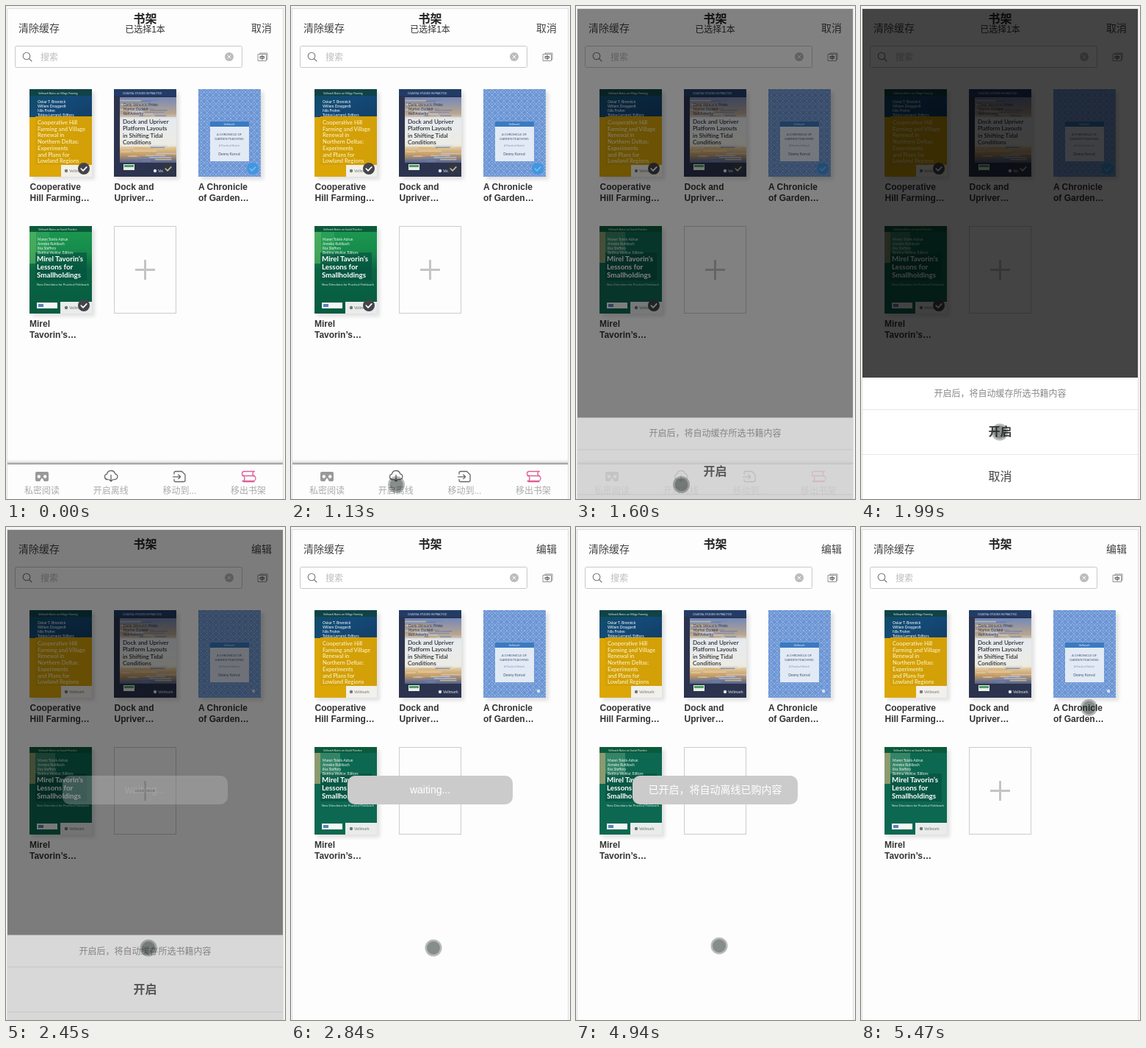
Write an HTML page that moves like this. It is 380 px wide and 670 px high and loops after 5550 ms.

```html
<!DOCTYPE html>
<html lang="zh-CN">
<head>
<meta charset="utf-8">
<title>书架</title>
<style>
html, body { margin: 0; width: 100%; height: 100%; overflow: hidden; background: #f5f5f5; }
svg { display: block; }
text { font-family: "Liberation Sans", "Noto Sans CJK SC", "Noto Sans CJK", sans-serif; white-space: pre; }
.cover text { font-family: Lato, "Open Sans", sans-serif; }
.cap { font-size: 12px; font-weight: 700; fill: #333; }
.tab { font-size: 12px; fill: #aaa; }
.line { fill: none; stroke: #666; stroke-width: 1.3; stroke-linecap: round; stroke-linejoin: round; }
</style>
</head>
<body>
<svg id="stage" width="380" height="670" viewBox="0 0 380 670"></svg>
<script>
const LOOP = 5550;
const FADE = 500;
const SHEET_H = 165;
const DIM = 0.73;

const rect = (x, y, w, h, fill, extra = "") =>
  `<rect x="${x}" y="${y}" width="${w}" height="${h}" fill="${fill}" ${extra}/>`;
const circle = (x, y, r, fill, extra = "") =>
  `<circle cx="${x}" cy="${y}" r="${r}" fill="${fill}" ${extra}/>`;
const path = (d, extra = "") => `<path class="line" d="${d}" ${extra}/>`;
const text = (x, y, size, fill, s, extra = "") =>
  `<text x="${x}" y="${y}" font-size="${size}" fill="${fill}" ${extra}>${s}</text>`;
const mid = (x, y, size, fill, s, extra = "") =>
  text(x, y, size, fill, s, 'text-anchor="middle" ' + extra);
const lines = (x, y, step, size, fill, list, extra) =>
  list.map((s, i) => text(x, y + i * step, size, fill, s, extra)).join("");
const group = (id, body, extra = "") => `<g id="${id}" ${extra}>${body}</g>`;

function random(seed) {
  return () => (seed = (seed * 16807) % 2147483647) / 2147483647;
}

function cover(x, y, body) {
  return rect(x + 4, y + 4, 85, 119, "#000", 'opacity=".11" filter="url(#soft)"') +
    `<g class="cover" transform="translate(${x} ${y})"><svg width="85" height="119">${body}</svg></g>`;
}

function publisher(x, y, fill) {
  return circle(x, y, 2.2, fill) + text(x + 4, y + 2, 5.5, fill, "Vellmark");
}

function farmBook() {
  const top = rect(0, 0, 85, 38, "url(#farm)") + rect(0, 0, 85, 9, "#0f4347") +
    text(12, 6.5, 3.6, "#e4efe6", "Vellmark Notes on Village Farming");
  const authors = ["Oskar T. Brennick", "Willem Draygardt", "Nils Frohm", "Tobias Lerrand, Editors"];
  const title = ["Cooperative Hill", "Farming and Village", "Renewal in", "Northern Deltas:", "Experiments", "and Plans for", "Lowland Regions"];
  return rect(0, 0, 85, 119, "#dba606") + top + rect(8, 37, 77, 66, "#d3a008") +
    lines(11, 18.5, 6.1, 5, "#fff", authors) +
    lines(11, 48, 8.7, 7.6, "#fff3c4", title, 'font-weight="500"') +
    rect(43, 103, 42, 16, "#f1f0ea") + publisher(50, 111, "#777");
}

function harbourBook() {
  const rnd = random(77);
  const tones = ["#7087bb", "#d9a566", "#c9d4e6", "#5f77aa", "#ecd9a6"];
  let streaks = "";
  for (let i = 0; i < 40; i++) {
    const y = i < 20 ? 12 + rnd() * 24 : 76 + rnd() * 22;
    streaks += rect(8 + rnd() * 50, y, 12 + rnd() * 25, 1.5, tones[i % 5], 'opacity=".65"');
  }
  const authors = ["Dario Velmonte Prisko", "Marten Oudekil", "Rolf Ankerby"];
  const title = ["Dock and Upriver", "Platform Layouts", "in Shifting Tidal", "Conditions"];
  return rect(0, 0, 85, 119, "#2b334e") + rect(0, 0, 85, 9, "#223c67") +
    text(12, 6.5, 3.6, "#dfe6f2", "COASTAL STUDIES IN PRACTICE") +
    rect(8, 11, 77, 89, "url(#harbour)") + streaks +
    rect(9, 38, 76, 40, "#eceff4", 'opacity=".7"') +
    lines(13, 22.5, 6.2, 4.8, "#27314d", authors) +
    lines(12, 47, 9.4, 8.1, "#1b1d24", title, 'font-weight="500"') +
    rect(13, 102, 15, 8, "#e7f0e6") + rect(14, 103, 13, 3, "#4d9b66") +
    publisher(56, 111, "#dfe3ec");
}

function gardenBook() {
  return rect(0, 0, 85, 119, "url(#lattice)") + rect(16, 44, 53, 54, "#e2eaf5") +
    rect(16, 44, 53, 7, "#3a7ac2") + mid(42, 49.3, 4, "#dbe8f7", "Vellmark") +
    mid(42, 62.5, 4.2, "#47546c", "A CHRONICLE OF") +
    mid(42, 68.5, 4.2, "#47546c", "GARDEN TEACHING") +
    mid(42, 77.5, 3.6, "#8494ad", "A Practical Sketch") +
    mid(42, 90, 5, "#47546c", "Denny Korval") + circle(75, 110, 2.2, "#d5e2f4");
}

function legacyBook() {
  const authors = ["Maren Tolvik-Adrun", "Anneke Ruhlbach", "Ilka Steffory", "Bettina Wohlar, Editors"];
  return rect(0, 0, 85, 119, "#07604b") +
    group("brightTop", rect(0, 0, 85, 119, "url(#bright)") + rect(0, 8, 9, 43, "#6bbf68", 'opacity=".55"') + rect(9, 8, 18, 43, "#3fae62", 'opacity=".4"')) +
    group("dullTop", rect(0, 0, 85, 119, "#0d6851") + rect(0, 8, 8, 42, "#b5ac78", 'opacity=".75"') + rect(8, 8, 27, 36, "#5f9f7e", 'opacity=".5"')) +
    rect(0, 0, 85, 8, "#0b5a3c") +
    text(12, 6, 3.6, "#dcece3", "Vellmark Notes on Social Practice") +
    rect(8, 36, 70, 38, "#04513f", 'opacity=".65"') +
    lines(11, 20, 6, 4.8, "#f2f8f4", authors) +
    lines(10, 47.5, 11.4, 9.8, "#fff", ["Mirel Tavorin’s", "Lessons for", "Smallholdings"], 'font-weight="700"') +
    text(10, 80.5, 4.2, "#e2efe8", "New Directions for Practical Fieldwork") +
    rect(10, 104, 28, 8, "#f5f7f6") + rect(12, 106, 7, 4, "#5b82b8") +
    rect(42, 103, 43, 16, "#e9ecea") + publisher(50, 111, "#697570");
}

function check(x, y, fill, mark = "#fff") {
  return circle(x, y, 8, fill) +
    path(`M${x - 3.8} ${y}l2.8 2.8l4.8 -5`, `style="stroke:${mark};stroke-width:1.7"`);
}

function tabBar() {
  const labels = ["私密阅读", "开启离线", "移动到...", "移出书架"];
  const pink = 'style="stroke:#de5f99"';
  const goggles = '<path fill="#999" d="M42 633h14q2 0 2 2v9q0 2-2 2h-3q-1.5 0-2-1.5l-1-2q-1-1.5-2 0l-1 2q-.5 1.5-2 1.5h-3q-2 0-2-2v-9q0-2 2-2z"/>' +
    circle(44.8, 639.5, 2.2, "#fdfdfd") + circle(53.2, 639.5, 2.2, "#fdfdfd");
  return rect(2, 616, 375, 7, "url(#edge)") + rect(2, 623, 375, 47, "#fdfdfd") + goggles +
    path("M139 643.5h-1a3.700 3.700 0 0 1-.6-7.300a5.800 5.800 0 0 1 11.300-.4a3.900 3.900 0 0 1-.4 7.700h-1.300M143 637.5v8.500M140.5 643.700l2.500 2.300l2.500-2.300") +
    path("M229 636v-1.500q0-2 2-2h8.500l4.5 4.500v7.500q0 2-2 2h-11q-2 0-2-2v-1M227.5 639.8h10M234.8 637l2.8 2.8l-2.800 2.800") +
    path("M338.5 632.5h-14a3 3 0 0 0 0 6h14M337 632.5q-2 3 0 6M322 638.5h14.5a3.500 3.500 0 0 1 0 7h-14.500M324 638.5q2 3.500 0 7M338 646.5h-15", pink) +
    labels.map((s, i) => `<text class="tab" x="${49 + i * 93.7}" y="662.5" text-anchor="middle">${s}</text>`).join("");
}

function sheet() {
  const top = 670 - SHEET_H;
  return rect(2, top, 375, SHEET_H, "#fff") +
    mid(189.5, top + 26, 12, "#888", "开启后，将自动缓存所选书籍内容") +
    rect(2, top + 43, 375, 1, "#e6e6e6") +
    mid(189.5, top + 79, 16, "#444", "开启", 'font-weight="700"') +
    rect(2, top + 104, 375, 1, "#e6e6e6") +
    mid(189.5, top + 140, 16, "#444", "取消");
}

const toast = s => rect(77, 338, 225, 39, "#cbcbcb", 'rx="10"') + mid(189.5, 362, 14, "#fff", s);

const stops = list => list.map(([o, c, a = 1]) => `<stop offset="${o}" stop-color="${c}" stop-opacity="${a}"/>`).join("");
const gradient = (id, list, dir = 'x2="0" y2="1"') => `<linearGradient id="${id}" ${dir}>${stops(list)}</linearGradient>`;

const defs = `<defs>
<filter id="soft" x="-20%" y="-20%" width="140%" height="140%"><feGaussianBlur stdDeviation="2.5"/></filter>
<pattern id="lattice" width="8" height="8" patternUnits="userSpaceOnUse">${rect(0, 0, 8, 8, "#6c95d4")}<path d="M0 4L4 0L8 4L4 8Z" fill="none" stroke="#93b3e3" stroke-width=".9"/>${circle(4, 4, 0.9, "#93b3e3")}</pattern>` +
  gradient("farm", [[0, "#0d4d60"], [0.5, "#144a78"], [1, "#123f66"]], 'x2="1" y2="1"') +
  gradient("harbour", [[0, "#7489b8"], [0.25, "#b9a58e"], [0.35, "#dcdfe4"], [0.7, "#f0e4c4"], [0.87, "#c79d66"], [1, "#52628f"]]) +
  gradient("bright", [[0, "#1b9a50"], [0.3, "#178a4b"], [0.5, "#0a6543"], [1, "#065b41"]]) +
  gradient("edge", [[0, "#777", 0], [0.5, "#777", 0.15], [1, "#777", 0.85]]) + "</defs>";

const header = text(17, 35, 14, "#444", "清除缓存") +
  group("title", mid(189.5, 28.5, 16, "#222", "书架", 'font-weight="700"')) +
  rect(12.5, 54.5, 309, 29, "#fff", 'rx="2" stroke="#c8c8c8"') +
  circle(28, 68, 4.8, "none", 'stroke="#777" stroke-width="1.1"') +
  path("M31.5 71.5l3.5 3.5", 'style="stroke:#777;stroke-width:1.1"') +
  text(47, 73.5, 12, "#bbb", "搜索") + circle(304, 69, 6, "#bcbcbc") +
  path("M302 67l4 4M306 67l-4 4", 'style="stroke:#fff;stroke-width:1"') +
  path("M346 65.5v-1.500h10v8.500h-1.500M343.5 65.5h11v9h-11z", 'style="stroke:#888;stroke-width:.9"') +
  path("M346.5 68.5h5v2.500h-5zM349 67v6", 'style="stroke:#555;stroke-width:1"');

function caption(x, y, list) {
  return list.map((s, i) => `<text class="cap" x="${x}" y="${y + i * 15}">${s}</text>`).join("");
}

const shelf = cover(32, 113, farmBook()) + cover(147, 113, harbourBook()) +
  cover(262, 113, gardenBook()) + cover(32, 299, legacyBook()) +
  caption(32.5, 250, ["Cooperative", "Hill Farming…"]) +
  caption(147.5, 250, ["Dock and", "Upriver…"]) +
  caption(262, 250, ["A Chronicle", "of Garden…"]) +
  caption(32, 436, ["Mirel", "Tavorin’s…"]) +
  rect(147.5, 299.5, 84, 118, "#fdfdfd", 'stroke="#ccc"') +
  rect(176, 357, 27, 3, "#c4c4c4") + rect(188, 345, 3, 27, "#c4c4c4");

const editing = mid(189.5, 35.5, 12, "#333", "已选择1本") + text(334, 35, 14, "#444", "取消") +
  check(106, 221, "#43454b") + check(221, 221, "#34363e", "#b4b7be") +
  check(336, 221, "#3f97e0", "#79b9ee") + check(106, 407, "#43454b") + tabBar();

const stage = document.getElementById("stage");
stage.innerHTML = defs + rect(0, 0, 380, 670, "#f5f5f5") +
  rect(1.5, 3.5, 376, 680, "#fdfdfd", 'stroke="#dedede"') + header + shelf +
  group("editing", editing) + group("browsing", text(334, 35, 14, "#444", "编辑")) +
  group("dim", rect(2, 4, 375, 666, "#000")) + group("sheet", sheet()) +
  group("waiting", toast("waiting...")) + group("done", toast("已开启，将自动离线已购内容")) +
  group("cursor", circle(0, 0, 11.5, "#14201a", 'opacity=".3"') + circle(0, 0, 9, "#14201a", 'opacity=".29"'));

const part = {};
stage.querySelectorAll("g[id]").forEach(g => part[g.id] = g);

// The picture advances in bursts of evenly spaced ticks: [first, last, count].
const bursts = [[0, 0, 1], [70, 70, 1], [210, 750, 8], [830, 1130, 5], [1300, 1840, 8], [1910, 2070, 3],
  [2300, 2840, 8], [3540, 4000, 7], [4860, 5400, 8], [5470, 5470, 1]];
const ticks = bursts.flatMap(([a, b, n]) =>
  Array.from({ length: n }, (_, i) => Math.floor((a + (b - a) * i / Math.max(1, n - 1)) / 10) * 10));
const snap = t => ticks.reduce((last, k) => k <= t ? k : last, 0);

// Pointer route: [time, x, y].
const route = [[70, 293.5, 661.5], [210, 290, 648], [370, 270, 608], [450, 257, 588], [520, 230, 567],
  [600, 200, 565.5], [680, 189, 574], [750, 183.5, 585.5], [910, 167, 614], [1060, 147, 646],
  [1130, 143.5, 650.5], [1600, 143.5, 650.5], [1840, 171.5, 609.5], [1990, 189, 579], [2070, 194, 572]];
const clamp = v => Math.min(1, Math.max(0, v));
const ramp = (t, start, length = FADE) => clamp((t - start) / length);

function pointer(t) {
  if (t >= 4790) {
    const u = ramp(t, 4790, 680) ** 3;
    return [194 + 116.5 * u, 572 - 326.5 * u];
  }
  const i = route.findIndex(p => p[0] > t);
  if (i < 0) return route[route.length - 1].slice(1);
  const [a, b] = [route[Math.max(0, i - 1)], route[i]];
  const u = ramp(t, a[0], b[0] - a[0]);
  return [a[1] + (b[1] - a[1]) * u, a[2] + (b[2] - a[2]) * u];
}

const show = (g, on) => g.setAttribute("visibility", on ? "visible" : "hidden");
const fade = (g, v) => g.setAttribute("opacity", v);
const move = (g, x, y) => g.setAttribute("transform", `translate(${x} ${y})`);

function draw(time) {
  const t = snap(time);
  const edit = t < 2300;
  const open = ramp(t, 1265) - ramp(t, 2300);
  const bright = t < 1300;
  const swap = ramp(t, 3500);
  show(part.editing, edit);
  show(part.browsing, !edit);
  show(part.brightTop, bright);
  show(part.dullTop, !bright);
  move(part.title, 0, edit ? -6 : 0);
  fade(part.dim, DIM * open);
  fade(part.sheet, open);
  move(part.sheet, 0, SHEET_H * (1 - open));
  fade(part.waiting, ramp(t, 2300) * (1 - swap));
  fade(part.done, swap - ramp(t, 4960));
  show(part.cursor, t >= 70);
  move(part.cursor, ...pointer(t));
}

const begin = performance.now();
function tick() {
  draw((performance.now() - begin) % LOOP);
  requestAnimationFrame(tick);
}
tick();
</script>
</body>
</html>
```
